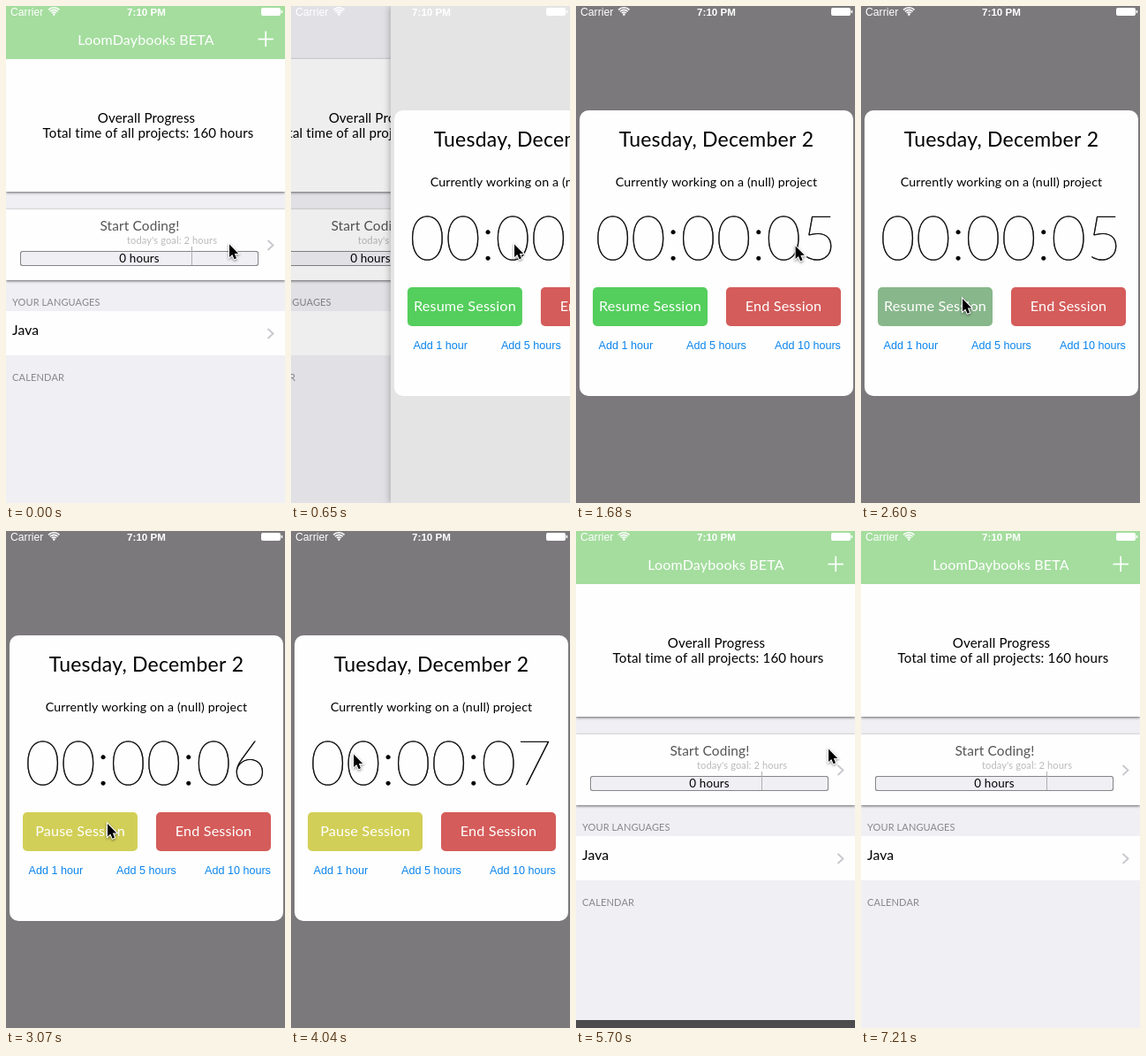
An HTML page with a canvas for the animation above (7800 ms loop, 316 by 562 pixels).

```html
<!DOCTYPE html>
<html lang="en">
<head>
<meta charset="utf-8">
<title>Coding session timer</title>
<style>
  html, body { margin: 0; width: 100%; height: 100%; overflow: hidden; background: #f0eff4; }
  canvas { display: block; width: 316px; height: 562px; }
</style>
</head>
<body>
<canvas id="stage"></canvas>
<script>
const W = 316, H = 562, LOOP = 7800;
const WHITE = '#fdfefd', GRAY = '#f0eff4';
const canvas = document.getElementById('stage');
const ctx = canvas.getContext('2d');
const dpr = window.devicePixelRatio || 1;
canvas.width = W * dpr;
canvas.height = H * dpr;

const clamp = v => Math.max(0, Math.min(1, v));
const span = (t, a, b) => clamp((t - a) / (b - a));
const mix = (a, b, p) => a + (b - a) * p;
const easeOut = p => 1 - (1 - p) ** 3;
const easeInOut = p => p * p * (3 - 2 * p);
const blend = (a, b, p) => `rgb(${a.map((v, i) => Math.round(mix(v, b[i], p)))})`;

function rect(x, y, w, h, color) {
  ctx.fillStyle = color;
  ctx.fillRect(x, y, w, h);
}

function round(x, y, w, h, r, color) {
  ctx.fillStyle = color;
  ctx.beginPath();
  ctx.roundRect(x, y, w, h, r);
  ctx.fill();
}

function line(points, color, width) {
  ctx.strokeStyle = color;
  ctx.lineWidth = width;
  ctx.beginPath();
  points.forEach(([x, y]) => ctx.lineTo(x, y));
  ctx.stroke();
}

function write(str, x, y, font, color, align, spacing) {
  ctx.font = font;
  ctx.letterSpacing = spacing + 'px';
  ctx.textAlign = align;
  ctx.fillStyle = color;
  ctx.fillText(str, x, y);
}

function label(str, x, y, size, color = '#000', align = 'center') {
  write(str, x, y, `400 ${size}px Lato, sans-serif`, color, align, size * 0.01);
}

function sans(str, x, y, size, color, align = 'left', weight = 400) {
  write(str, x, y, `${weight} ${size}px "Liberation Sans", Arial, sans-serif`, color, align, 0);
}

function withShadow(color, blur, dy, draw) {
  ctx.save();
  ctx.shadowColor = color;
  ctx.shadowBlur = blur * dpr;
  ctx.shadowOffsetY = dy * dpr;
  draw();
  ctx.restore();
}

function panel(y, h) {
  withShadow('rgba(0,0,0,.6)', 3, 1, () => rect(0, y, W, h, WHITE));
}

function chevron(y) {
  line([[296.5, y - 5.5], [302.5, y], [296.5, y + 5.5]], '#c7c7cc', 1.8);
}

function statusBar() {
  sans('Carrier', 5, 10.5, 12.2, '#fff');
  sans('7:10 PM', 159, 10.5, 11.6, '#fff', 'center', 700);
  ctx.strokeStyle = '#fff';
  ctx.lineWidth = 1.6;
  for (const r of [3.6, 6.2, 8.8]) {
    ctx.beginPath();
    ctx.arc(54.3, 10.6, r, -Math.PI * 0.75, -Math.PI * 0.25);
    ctx.stroke();
  }
  ctx.fillStyle = '#fff';
  ctx.beginPath();
  ctx.arc(54.3, 9.6, 1.3, 0, 7);
  ctx.fill();
  round(289, 2, 22, 9, 2, '#fff');
  round(311.6, 4.7, 1.6, 3.6, 0.8, '#fff');
}

function header() {
  rect(0, 0, W, 60, '#a4dd9e');
  label('LoomDaybooks BETA', 158.5, 44, 16, '#fff');
  line([[285.5, 37.5], [303, 37.5]], '#fff', 1.7);
  line([[294.2, 28.5], [294.2, 46]], '#fff', 1.7);
}

function home(dx) {
  ctx.save();
  ctx.translate(dx, 0);
  rect(0, 0, W, H, GRAY);
  panel(60, 150);
  label('Overall Progress', 159, 132, 15.1);
  label('Total time of all projects: 160 hours', 161, 149, 15.1);

  panel(230, 80);
  label('Start Coding!', 151.5, 253.5, 15.4, '#555');
  label("today's goal: 2 hours", 188, 269, 11.1, '#bababa');
  round(16, 277, 270, 17, 2.5, '#858588');
  round(17, 278, 268, 15, 2, '#f0eff4');
  line([[210.5, 272], [210.5, 293]], '#b0b0b2', 1);
  label('0 hours', 151, 290, 13.4);
  chevron(270.5);

  label('YOUR LANGUAGES', 7, 339, 11, '#88888c', 'left');
  rect(0, 345, W, 50, WHITE);
  label('Java', 7, 371.5, 15.7, '#000', 'left');
  chevron(370.5);
  label('CALENDAR', 7, 424, 11.1, '#88888c', 'left');
  ctx.restore();
}

function button(x, color, str) {
  round(x, 318, 130, 44, 5, color);
  label(str, x + 65, 345, 16.2, '#fff');
}

function clock(seconds) {
  const str = `00:00:0${seconds}`;
  write(str, 158.5, 286.5, '200 69.5px Lato, sans-serif', '#000', 'center', 0);
  ctx.strokeStyle = '#000';
  ctx.lineWidth = 0.5;
  ctx.strokeText(str, 158.5, 286.5);
}

function session(t, dx, back) {
  ctx.save();
  ctx.translate(dx, 0);
  if (dx > 0) withShadow('rgba(0,0,0,.35)', 8, 0, () => rect(0, 0, W, H, back));
  rect(0, 0, W, H, back);
  round(4, 118, 310, 323, 10, WHITE);
  label('Tuesday, December 2', 159, 158.5, 23);
  label('Currently working on a (null) project', 159, 204, 14.2);
  clock(5 + [2740, 3700, 4680].filter(at => t >= at).length);

  const running = t >= 2720;
  const pressed = [136, 183, 139];
  const tint = t < 2600 ? 'rgb(84,206,92)'
    : blend(pressed, [210, 207, 88], span(t, 2720, 3070));
  button(19, tint, running ? 'Pause Session' : 'Resume Session');
  button(170, '#d45c5a', 'End Session');
  const blue = '#0a84ee';
  sans('Add 1 hour', 25.5, 388, 12.6, blue);
  sans('Add 5 hours', 125, 388, 12.6, blue);
  sans('Add 10 hours', 225, 388, 12.6, blue);
  ctx.restore();
}

// start, end, x, y of each pointer move
const moves = [
  [1600, 2360, 115, 331],
  [3480, 4040, 71, 252.5],
  [4640, 4820, 266, 246],
  [4820, 5100, 286, 246.5],
  [6980, 7210, 286, 562]
];

function pointer(t) {
  if (t >= 7200) return;
  let x = 253, y = 269.5;
  for (const [a, b, tx, ty] of moves) {
    const p = easeInOut(span(t, a, b));
    x = mix(x, tx, p);
    y = mix(y, ty, p);
  }
  ctx.save();
  ctx.translate(x, y);
  ctx.beginPath();
  [[0, 0], [0, 14.5], [3.3, 11.5], [5.6, 16.8], [8, 15.8], [5.8, 10.6], [10.2, 10.4]]
    .forEach(([px, py]) => ctx.lineTo(px, py));
  ctx.closePath();
  ctx.lineWidth = 2;
  ctx.strokeStyle = '#fff';
  withShadow('rgba(0,0,0,.45)', 3, 1.2, () => ctx.stroke());
  ctx.fillStyle = '#000';
  ctx.fill();
  ctx.restore();
}

// dark strip that peeks up from the bottom edge
function strip(t) {
  if (t < 5700 || t >= 6290) return;
  const h = t < 5790 ? 9 : t < 5900 ? mix(15, 1, span(t, 5790, 5900)) : 1;
  rect(0, H - h, W, h, '#4c4c4e');
}

function draw(t) {
  ctx.setTransform(dpr, 0, 0, dpr, 0, 0);
  const push = easeOut(span(t, 500, 1020));
  const pop = easeOut(span(t, 4800, 5310));
  const popping = t >= 4800;
  const shown = push - pop;

  home(-95 * shown);
  if (shown > 0) {
    rect(0, 0, W, H, `rgba(0,0,0,${0.1 * shown})`);
    const back = popping ? WHITE
      : blend([253, 254, 253], [123, 121, 123], span(t, 500, 1270));
    session(t, W * (1 - shown), back);
  }
  if (t < 500 || popping) header();
  statusBar();
  strip(t);
  pointer(t);
}

function tick() {
  draw(performance.now() % LOOP);
  requestAnimationFrame(tick);
}
tick();
</script>
</body>
</html>
```
